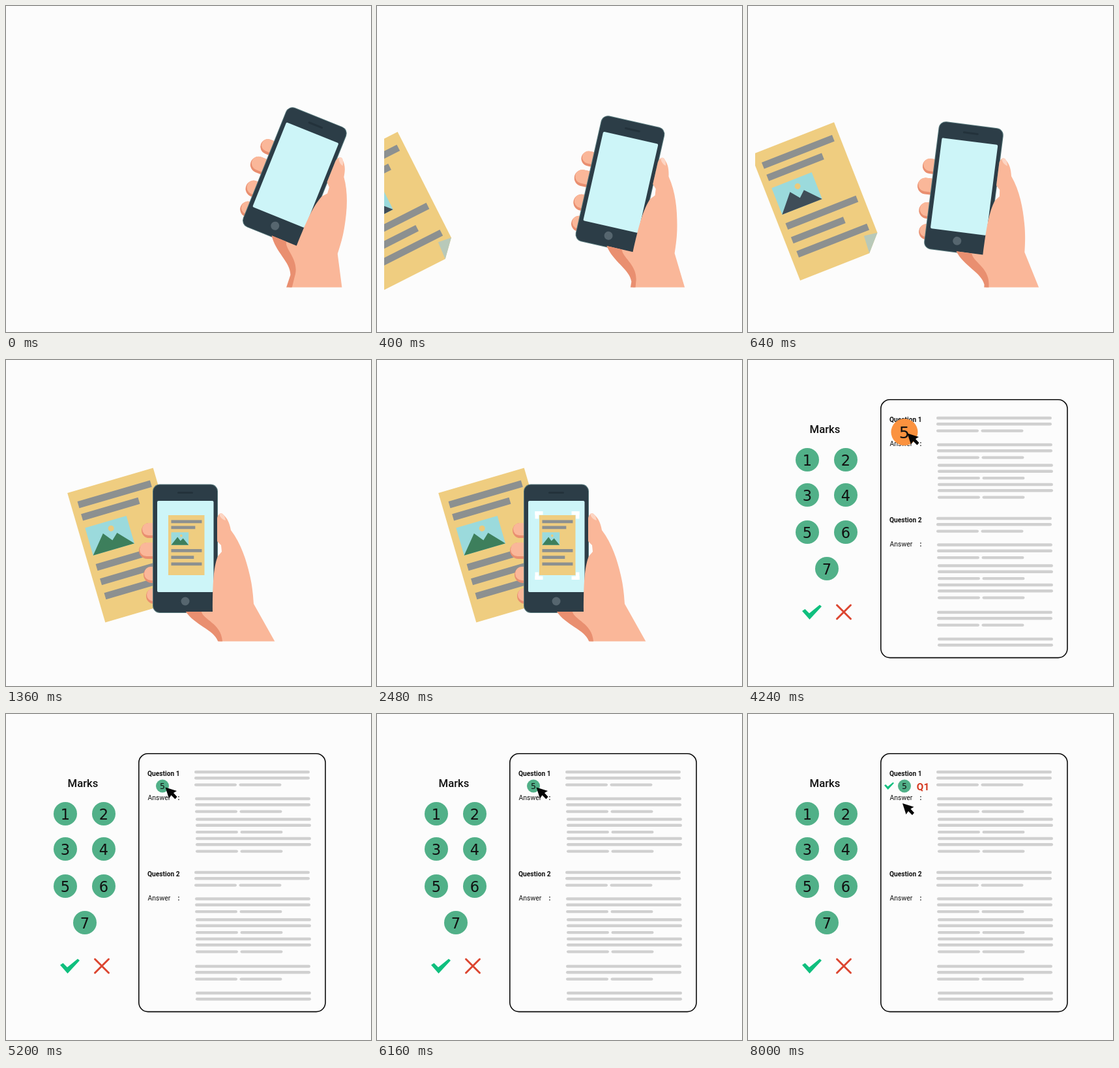
These frames come from a looping animation (560 by 500 pixels, 8040 ms). An HTML page with a canvas:

```html
<!DOCTYPE html>
<html lang="en">
<head>
<meta charset="utf-8">
<title>Scan and mark</title>
<style>
  html, body { margin: 0; width: 100%; height: 100%; overflow: hidden; background: #fcfcfc; }
  canvas { display: block; }
</style>
</head>
<body>
<canvas id="stage" width="560" height="500"></canvas>
<script>
const ctx = document.getElementById('stage').getContext('2d');
const LOOP = 8040, STEP = 80, CUT = 2600;
const PAPER = '#fcfcfc', GREEN = '#51b088', ORANGE = '#fb923f', RED = '#dc4631', TICK = '#0fbf7e';
const SKIN = '#fab799', SHADE = '#e98f70', SLATE = '#2c3d47';

const lerp = (a, b, p) => a + (b - a) * p;
const progress = (t, start, end) => Math.min(1, Math.max(0, (t - start) / (end - start)));
const smooth = p => p * p * (3 - 2 * p);
const backOut = p => 1 + 2.7 * (p - 1) ** 3 + 1.7 * (p - 1) ** 2;

function at(x, y, angle, sx, sy, draw) {
  ctx.save();
  ctx.translate(x, y);
  ctx.rotate(angle * Math.PI / 180);
  ctx.scale(sx, sy);
  draw();
  ctx.restore();
}
function fill(color, path) {
  ctx.fillStyle = color;
  ctx.fill(path);
}
function rect(color, x, y, w, h, r = 0) {
  ctx.fillStyle = color;
  ctx.beginPath();
  ctx.roundRect(x, y, w, h, r);
  ctx.fill();
}
function disc(color, x, y, r) {
  ctx.fillStyle = color;
  ctx.beginPath();
  ctx.arc(x, y, r, 0, 7);
  ctx.fill();
}
function text(str, x, y, font, color = '#111', align = 'left') {
  ctx.font = font;
  ctx.fillStyle = color;
  ctx.textAlign = align;
  ctx.fillText(str, x, y);
}

// ---- Scene 1: scanning a page with a phone ----

const pageShape = new Path2D('M0 0H137V182L114 207H0Z');
const pageFold = new Path2D('M137 182L116 179L114 207Z');
const mountains = new Path2D('M0 44L24 16L35 30L45 21L66 44Z');

function drawPage(mountainColor, curled) {
  if (curled) fill('#efcd80', pageShape);
  else rect('#efcd80', 0, 0, 137, 207);
  for (const [y, w] of [[17, 116], [37, 91], [117, 116], [140, 86], [163, 116]])
    rect('#8c9090', 11, y, w, 10.5);
  rect('#9bdadc', 11, 59, 66, 44);
  disc('#ecca7c', 49, 71, 4.5);
  at(11, 59, 0, 1, 1, () => fill(mountainColor, mountains));
  if (curled) fill('#b8c9b9', pageFold);
}

const palm = new Path2D(`M324 243C325 236 330 233 333 237C340 243 343 250 345 261
  C361 282 369 308 374 330C378 347 379 360 380 374L412 431L465 525H345
  L327 431C323 411 292 407 276 386H317C317 345 318 318 325 301L331 294L330 284L324 278Z`);
const palmShade = new Path2D(`M276 386H300C302 398 330 404 332 431L345 525H331L325 431C318 413 290 407 276 386Z`);
const thumbNail = new Path2D('M327 236C331 233 335 236 337 246C332 245 328 241 327 236Z');

function drawHandAndPhone(t) {
  for (const [x, y, h] of [[208, 250, 23], [204, 280, 25], [211, 317, 25], [215, 350, 24]]) {
    rect(SHADE, x, y, 40, h, h / 2);
    rect(SKIN, x + 1, y, 40, h - 4, h / 2 - 2);
  }
  rect('#56777a', 225, 190.5, 100, 197.5, 11);
  rect(SLATE, 226, 191.5, 98, 195.5, 10);
  rect('#23323b', 263, 202, 24, 3, 1.5);
  rect('#cdf5f8', 232, 216, 86.5, 140, 2);
  disc('#56666f', 275, 370, 6.5);
  drawScreen(t);
  fill(SKIN, palm);
  fill(SHADE, palmShade);
  fill('#fdd5c3', thumbNail);
}

function drawScreen(t) {
  ctx.globalAlpha = progress(t, 960, 1280);
  at(249, 238, 0, .405, .445, () => drawPage('#3d7f5c', false));
  const p = progress(t, 1840, 2160);
  ctx.globalAlpha = p;
  for (const sx of [-1, 1]) for (const sy of [-1, 1])
    at(276.5, 284.5, 0, sx * lerp(1.15, 1, p), sy * lerp(1.15, 1, p), () => {
      rect('#fff', 22, 47, 12, 5.5);
      rect('#fff', 28.5, 41, 5.5, 11.5);
    });
  ctx.globalAlpha = 1;
}

function scanScene(t) {
  const u = progress(t, 0, 960);
  const away = (1 - u) ** 1.3;

  ctx.save();
  ctx.beginPath();
  ctx.rect(11, 0, 549, 500);
  ctx.clip();
  at(189 - 346 * away, 284 + 65 * away, -16.3 - 21.3 * away, 1, 1, () => {
    ctx.translate(-68.5, -103.5);
    drawPage(t < 960 ? '#3f4d58' : '#3d7f5c', true);
  });
  ctx.restore();

  ctx.save();
  ctx.beginPath();
  ctx.rect(0, 0, 560, 431.5);
  ctx.clip();
  at(lerp(443, 275, u), lerp(262, 289, u), lerp(21.9, 0, u), 1, 1, () => {
    ctx.translate(-275, -289);
    drawHandAndPhone(t);
  });
  ctx.restore();
}

// ---- Scene 2: marking the answers ----

const buttons = [[91, 153], [150, 153], [91, 207], [150, 207], [91, 264], [150, 264], [121, 320]];
const tick = new Path2D('M-14 -1L-9.5 -4L-3 2.5L13 -10.5L16 -8L-2.5 12Z');
const cross = new Path2D('M-10.5 -10.5L10.5 10.5M10.5 -10.5L-10.5 10.5');
const arrow = new Path2D('M0 0L17.5 5.5L12.5 8.5L18 14.5L15 18L9 12L5.5 17Z');

function drawBadge(label, x, y, r, color, fontSize) {
  disc(color, x, y, r);
  text(label, x, y + fontSize * .38, `${fontSize}px "DejaVu Sans", sans-serif`, '#111', 'center');
}

function drawSheet() {
  ctx.strokeStyle = '#0b0b0b';
  ctx.lineWidth = 1.6;
  ctx.beginPath();
  ctx.roundRect(203.8, 60.8, 286.2, 395.8, 14);
  ctx.stroke();

  [89, 130, 161.5, 191, 243, 283.5, 315.5, 345, 387, 428].forEach((y, i) => {
    const x = [289, 290, 291, 291][i % 4 + (i > 7 ? 1 : 0)];
    const line = (dx, dy, w) => rect('#d0d0d0', x + dx, y + dy - 2.2, w, 4.4, 2.2);
    line(0, 0, 177);
    line(0, 9.3, 177);
    if (i < 9) {
      line(0, 19.6, 65);
      line(68.5, 19.6, 65);
    }
  });

  [[1, 95, 132], [2, 249, 286]].forEach(([n, questionY, answerY]) => {
    text('Question ' + n, 217, questionY, 'bold 10.2px Roboto, sans-serif');
    text('Answer', 217.5, answerY, '10.4px Roboto, sans-serif');
    text(':', 263.5, answerY, 'bold 10.4px Roboto, sans-serif');
  });
}

function drawPanel(t) {
  const pop = (i, x, y, draw) => {
    const start = 2560 + i * 50;
    const s = backOut(progress(t, start, start + 320));
    if (t > start) at(x, y, 0, s, s, draw);
  };
  pop(0, 118, 106, () => text('Marks', 0, 6, '500 16.7px Roboto, sans-serif', '#111', 'center'));
  buttons.forEach(([x, y], i) => pop(i + 1, x, y, () => drawBadge(i + 1, 0, 0, 18, GREEN, 22.5)));
  pop(8, 97, 386, () => fill(TICK, tick));
  pop(9, 147, 386.5, () => {
    ctx.strokeStyle = RED;
    ctx.lineWidth = 3;
    ctx.lineCap = 'round';
    ctx.stroke(cross);
  });
}

// Cursor stops: [time, x, y]
const cursorPath = [
  [3600, 512, 438], [3920, 95, 267], [4240, 244.5, 112.5], [6240, 244.5, 112.5],
  [6640, 100, 388], [7040, 221, 113], [7120, 221, 113], [7520, 237, 137]
];
function cursorAt(t) {
  const next = cursorPath.findIndex(stop => stop[0] > t);
  if (next < 0) return cursorPath.at(-1).slice(1);
  const [t0, x0, y0] = cursorPath[next - 1], [t1, x1, y1] = cursorPath[next];
  const p = smooth(progress(t, t0, t1));
  return [lerp(x0, x1, p), lerp(y0, y1, p)];
}

function markScene(t) {
  drawSheet();
  drawPanel(t);
  if (t < 3600) return;
  const [x, y] = cursorAt(t);

  if (t >= 3920) {
    const grow = progress(t, 3920, 4080), drop = smooth(progress(t, 4480, 4800));
    const r = lerp(lerp(18, 20.5, grow), 10, drop);
    const [bx, by] = t < 4240 ? [x - 4.5, y - 2] : [240, 110.5];
    drawBadge(5, bx, by, r, drop > .5 ? GREEN : ORANGE, r * 1.25);
  }
  if (t >= 6640) {
    const s = lerp(1, .5, progress(t, 6640, 7040));
    const [tx, ty] = t < 7040 ? [x - 5, y - 3] : [216, 110];
    at(tx, ty, 0, s, s, () => fill(TICK, tick));
  }
  if (t > 6960) {
    const s = backOut(progress(t, 6960, 7200));
    at(268.5, 111, 0, s, s, () => text('Q1', 0, 5.5, 'bold 15.3px Roboto, sans-serif', '#d5381f', 'center'));
  }
  at(x, y, 0, 1, 1, () => fill('#050505', arrow));
}

function frame(now) {
  const t = Math.floor(now % LOOP / STEP) * STEP;
  rect(PAPER, 0, 0, 560, 500);
  (t < CUT ? scanScene : markScene)(t);
  requestAnimationFrame(frame);
}
frame(0);
</script>
</body>
</html>
```
